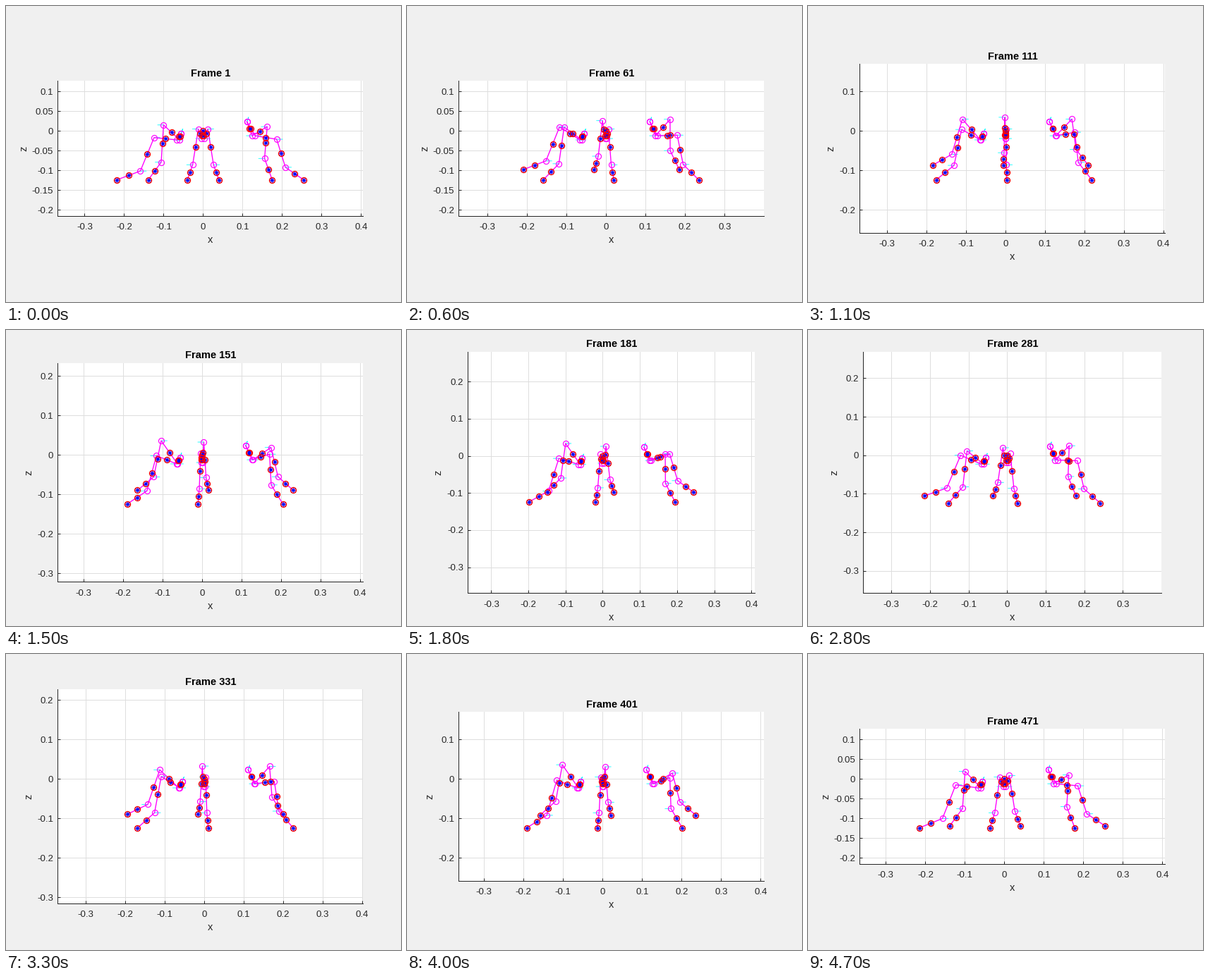
Recreate the animation shown at these times as a matplotlib script. Size 560 by 420 pixels, loop 4.8 s.

```python
import numpy as np
import matplotlib.pyplot as plt
from matplotlib.animation import FuncAnimation
from matplotlib.ticker import FuncFormatter, MultipleLocator

W, H, DPI = 560, 420, 100
PX = 72 / DPI                      # points per pixel
FRAMES, HALF = 48, 24              # one gait cycle, one stance or swing phase
CX, CY = 289.5, 202                # centre of the plot box, pixels from top left
BOX_W, BOX_H = 433, 342.5          # largest plot box
X_SPAN, Z_MID = 0.773, -0.0445
STEP, LIFT, AXIS = 0.04, 0.0375, 0.015
INK, MAGENTA = "#262626", "#ff00ff"

plt.rcParams["font.family"] = "Liberation Sans"
plt.rcParams["axes.unicode_minus"] = False

# Rest pose of each leg pair, rear to front: hip, coxa, knee, ankle, foot.
REAR = [(-0.0555, -0.0065), (-0.0633, -0.023), (-0.112, 0.002),
        (-0.1325, -0.0885), (-0.179, -0.1245)]
MIDDLE = [(0, -0.006), (0, -0.0196), (0, 0.0045), (0, -0.086), (0, -0.1245)]
FRONT = [(0.111, 0.023), (0.128, -0.0125), (0.1742, -0.0022),
         (0.182, -0.079), (0.215, -0.1245)]

# How far each joint follows the foot sideways and up, and how far it drops
# as a splayed leg stretches.
FOLLOW = np.array([0, 0.09, 0.3, 0.66, 1])
RAISE = np.array([0, 0, 0.8, 0.82, 1])
DROP = np.array([0, 0, 0.4, 0.28, 0])

# Visible height of the plot over the cycle.
SPAN_KEYS = [(7, 0.341), (11, 0.427), (18, 0.65), (24, 0.695),
             (33, 0.541), (40, 0.427), (47, 0.341)]


def foot_offset(t):
    """Foot x offset and lift at gait time t: straight stance, then a swing."""
    t %= FRAMES
    s = t % HALF / HALF
    if t < HALF:
        return STEP * (1 - 2 * s), 0.0
    ease = s * s * (3 - 2 * s) - 0.3 * s * (1 - s) * (1 - 2 * s)
    return STEP * (2 * ease - 1), LIFT * np.sin(np.pi * s)


def leg_points(rest, splay, u, lift):
    """Joint positions; splay is -1, 0 or 1 for rear, middle and front."""
    pts = np.array(rest, float)
    pts[:, 0] += FOLLOW * u
    pts[:, 1] += RAISE * lift - DROP * (splay * u + 5 * (splay * u) ** 2)
    pts[2, 0] -= 0.12 * splay * lift
    return pts


def tick_text(v, _):
    return f"{round(v, 2) + 0:g}"


fig = plt.figure(figsize=(W / DPI, H / DPI), dpi=DPI, facecolor="#f0f0f0")
ax = fig.add_axes([0.1, 0.1, 0.8, 0.8], facecolor="white")
ax.set_axisbelow(True)
ax.grid(True, color="#dedede", lw=PX)
ax.tick_params(direction="in", length=4 * PX, width=PX, color=INK,
               labelcolor=INK, labelsize=13.3 * PX)
ax.tick_params(axis="x", pad=10.5 * PX)
ax.tick_params(axis="y", pad=6 * PX)
for name, spine in ax.spines.items():
    spine.set(visible=name in ("left", "bottom"), color=INK, lw=PX)
for axis in (ax.xaxis, ax.yaxis):
    axis.set_major_formatter(FuncFormatter(tick_text))
ax.xaxis.set_major_locator(MultipleLocator(0.1))


def label(text, **kw):
    return fig.text(0, 0, text, fontsize=14.67 * PX, ha="center", **kw)


def place(text, x, y):
    text.set_position((x / W, 1 - y / H))


title = label("", weight="bold", color="black", va="center_baseline")
x_label = label("x", color=INK, va="center")
z_label = label("z", color=INK, va="center", rotation=90)


def marks(marker, color, size, width, z):
    return ax.plot([], [], ls="", marker=marker, ms=size * PX, mew=width * PX,
                   mfc="none", mec=color, zorder=z)[0]


axes_line, = ax.plot([], [], color="cyan", lw=0.8 * PX, zorder=2)
bones = [ax.plot([], [], color=MAGENTA, lw=1.35 * PX, zorder=3)[0] for _ in range(6)]
joints = marks("o", MAGENTA, 8, 1.2, 4)
stars = marks((8, 2, 0), "blue", 7, 0.8, 5)
masses = marks("o", "red", 8, 1.35, 6)


def draw_axes(x_mid, span):
    scale = min(BOX_W / X_SPAN, BOX_H / span)
    w, h = X_SPAN * scale, span * scale
    left, top, bottom = CX - w / 2, CY - h / 2, CY + h / 2
    ax.set_position([left / W, 1 - bottom / H, w / W, h / H])
    ax.set_xlim(x_mid - X_SPAN / 2, x_mid + X_SPAN / 2)
    ax.set_ylim(Z_MID - span / 2, Z_MID + span / 2)
    fine = span < 0.38
    ax.yaxis.set_major_locator(MultipleLocator(0.05 if fine else 0.1))
    place(title, CX + 0.5, top - 12)
    place(x_label, CX + 0.5, bottom + 34.5)
    place(z_label, left - (48 if fine else 41), CY)


def draw(i):
    pivots, centres, arrows, feet = [], [(0, 0)], [], []
    for k, rest in enumerate((REAR, MIDDLE, FRONT)):
        for n in (0, 1):
            pts = leg_points(rest, k - 1, *foot_offset(i + HALF * n))
            bones[2 * k + n].set_data(*pts.T)
            pivots.extend(pts[:4])
            centres.extend((pts[1:] + pts[:-1]) / 2)
            centres.append(pts[4])
            feet.append(pts[4, 0])
            side = 1 if (k == 0) == (n == 1) else -1
            ends = [(0.004, 0.011)] + [(side * AXIS, 0)] * 3
            for p, d in zip(pts, ends):
                arrows += [p, p + d, (np.nan, np.nan)]
    axes_line.set_data(*np.array(arrows).T)
    joints.set_data(*np.array(pivots).T)
    for m in (masses, stars):
        m.set_data(*np.array(centres).T)
    title.set_text(f"Frame {10 * i + 1}")
    draw_axes((min(feet) + max(feet)) / 2, np.interp(i, *zip(*SPAN_KEYS)))


anim = FuncAnimation(fig, draw, frames=FRAMES, interval=100, repeat=True,
                     repeat_delay=0, blit=False)
plt.show()
```
